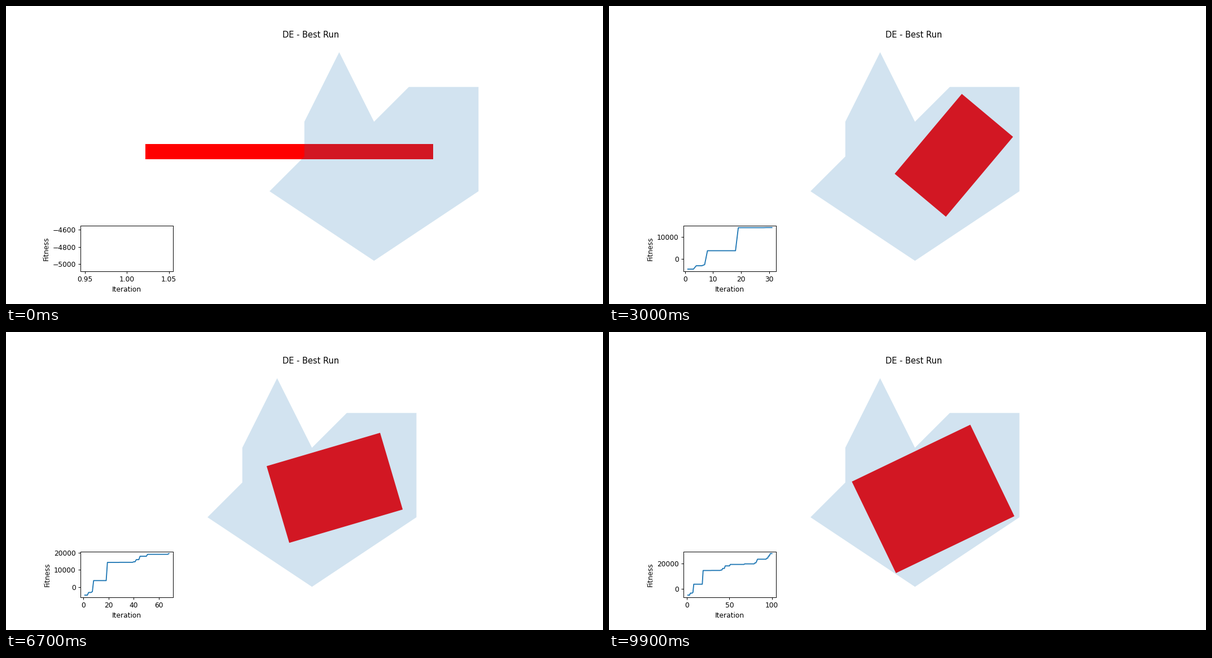
Write a matplotlib script that moves like this. It is 1058 px wide and 529 px high and loops after 10 s.

```python
import matplotlib.pyplot as plt
from matplotlib.animation import FuncAnimation
from matplotlib.patches import Polygon
from matplotlib.path import Path
import numpy as np

STEPS = 100
DPI = 88
SHAPE = [(0, 100), (50, 150), (50, 200), (100, 300), (150, 200),
         (200, 250), (300, 250), (300, 100), (150, 0)]

# milestone rectangles: corner x, y, width, height, angle
KEYS = np.array([
    (-178.2, 146.4, 413.1, 21.2, 0),
    (237.4, 195.5, 124.5, 42.1, -28.6),
    (190, 142.1, 84, 44, 60),
    (100, 68.7, 152.5, 94.1, 23.3),
    (194.4, 63.4, 150, 96, 50),
    (81.2, 131.5, 195.2, 81.8, -12.97),
    (130.8, 47.2, 177.9, 107.3, 26.5),
    (117.4, 63.2, 169.8, 115, 16.4),
    (122.7, 19.7, 188.7, 146, 25.7),
])

# iteration of each improvement -> progress along the milestones
GAINS = {1: 0, 4: 0.25, 7: 1, 8: 2, 19: 3, 29: 4, 40: 4.15, 42: 5, 45: 5.6,
         51: 6, 68: 7, 80: 7.1, 82: 7.27, 83: 7.47, 94: 7.57, 96: 7.78, 98: 8}


def corners(x, y, w, h, angle):
    a = np.radians(angle)
    u = np.array([np.cos(a), np.sin(a)]) * w
    v = np.array([-np.sin(a), np.cos(a)]) * h
    p = np.array([x, y])
    return np.array([p, p + u, p + u + v, p + v])


def best_rect(iteration):
    progress = max(p for i, p in GAINS.items() if i <= iteration)
    milestones = np.arange(len(KEYS))
    return [np.interp(progress, milestones, column) for column in KEYS.T]


def score(rect):
    """Area when the rectangle fits, otherwise minus the area sticking out."""
    p, right, _, up = corners(*rect)
    s, t = np.meshgrid(*[(np.arange(80) + 0.5) / 80] * 2)
    points = p + s.reshape(-1, 1) * (right - p) + t.reshape(-1, 1) * (up - p)
    outside = 1 - Path(SHAPE + SHAPE[:1]).contains_points(points).mean()
    area = rect[2] * rect[3]
    return area if outside < 0.02 else -area * outside


iterations = np.arange(1, STEPS + 1)
rects = [best_rect(i) for i in iterations]
fitness = [score(r) for r in rects]

fig = plt.figure(figsize=(1058 / DPI + 1e-6, 529 / DPI + 1e-6), dpi=DPI)
ax = fig.add_axes([0.125, 0.11, 0.775, 0.77])
ax.axis("off")
ax.set_title("DE - Best Run ", fontsize=12)
ax.set_ylim(-15, 315)
half_width = 165 * (0.775 * 1058) / (0.77 * 529)

box = ax.add_patch(Polygon(corners(*rects[0]), fc="red", ec="none", zorder=1))
ax.add_patch(Polygon(SHAPE, fc="tab:blue", ec="none", alpha=0.2, zorder=2))

plot = fig.add_axes([0.125, 0.11, 0.155, 0.1535])
plot.set_xlabel("Iteration")
plot.set_ylabel("Fitness")
curve, = plot.plot([], [], color="tab:blue")


def draw(frame):
    pts = corners(*rects[frame])
    box.set_xy(pts)
    mid = (min(0, pts[:, 0].min()) + max(300, pts[:, 0].max())) / 2
    ax.set_xlim(mid - half_width, mid + half_width)
    curve.set_data(iterations[:frame + 1], fitness[:frame + 1])
    plot.relim()
    plot.autoscale_view()
    return box, curve


anim = FuncAnimation(fig, draw, frames=STEPS, interval=100, repeat=True,
                     repeat_delay=0, blit=False)
plt.show()
```
